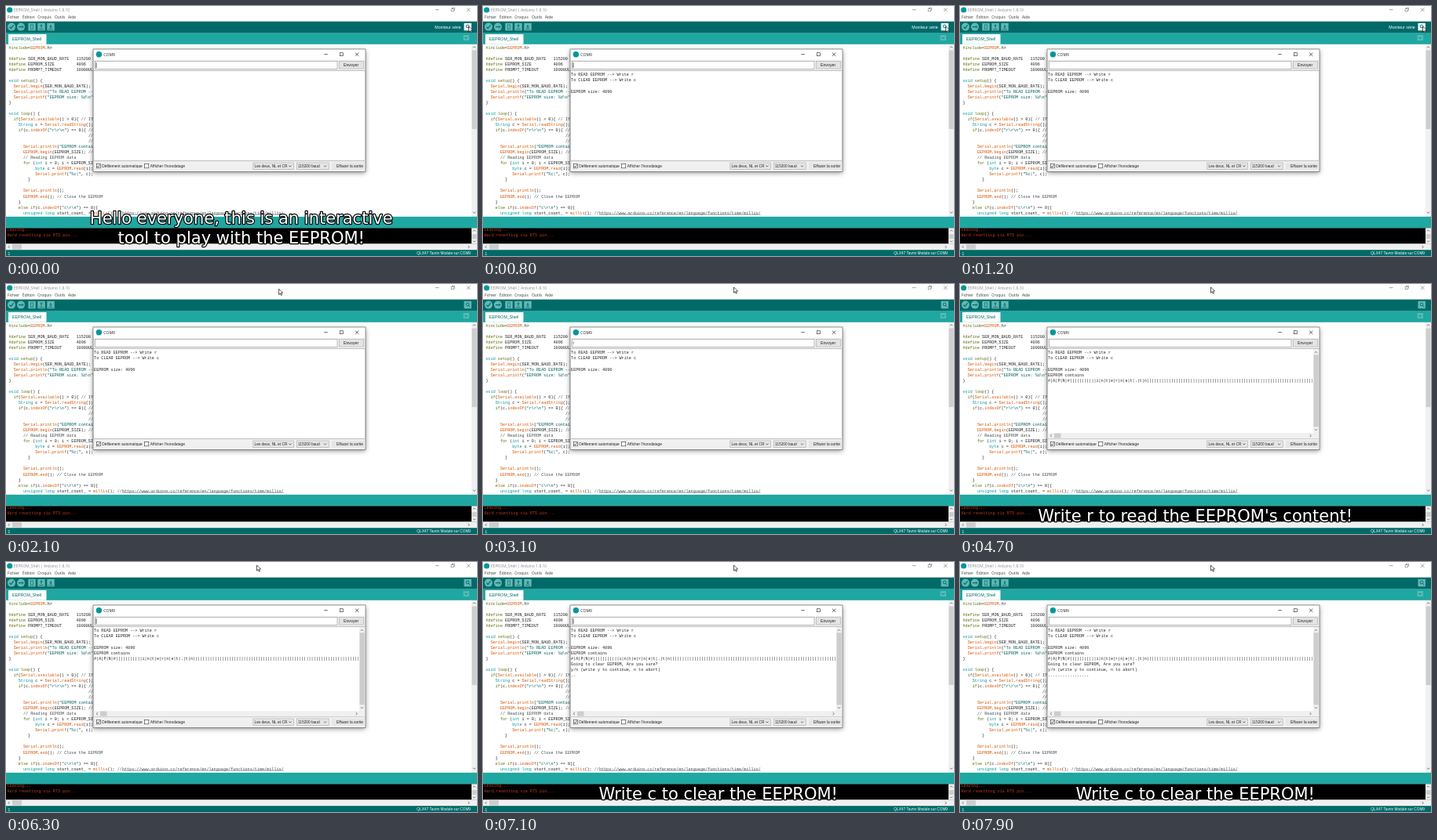
Write an HTML page with a canvas that moves like this. It is 600 px wide and 319 px high and loops after 8000 ms.

```html
<!DOCTYPE html>
<html lang="fr">
<head>
<meta charset="utf-8">
<title>EEPROM shell</title>
<style>
html, body { margin: 0; width: 100%; height: 100%; overflow: hidden; background: #fff; }
canvas { display: block; width: 600px; height: 319px; }
</style>
</head>
<body>
<canvas id="stage"></canvas>
<script>
const W = 600, H = 319, LOOP = 8000;
const canvas = document.getElementById('stage');
const dpr = window.devicePixelRatio || 1;
canvas.width = Math.round(W * dpr);
canvas.height = Math.round(H * dpr);
const ctx = canvas.getContext('2d');

const SANS = '"Liberation Sans", Arial, sans-serif';
const UI = '"Open Sans", "Noto Sans", sans-serif';
const MONO = '"Liberation Mono", "Courier New", monospace';
const CAPTION = '"DejaVu Sans", Verdana, sans-serif';
const DARK = '#006a69', TEAL = '#1fa7a2', PALE = '#f0f0f0', THUMB = '#cdcdcd';
const CODE = 5.12, PITCH = CODE * 0.6;

const SOURCE = `#include<EEPROM.h>

#define SER_MON_BAUD_RATE   115200
#define EEPROM_SIZE         4096
#define PROMPT_TIMEOUT      10000UL

void setup() {
  Serial.begin(SER_MON_BAUD_RATE);
  Serial.println("To READ EEPROM --> Write r");
  Serial.printf("EEPROM size: %d\\n", EEPROM_SIZE);
}

void loop() {
  if(Serial.available() > 0){ // If
    String c = Serial.readString();
    if(c.indexOf("r\\r\\n") == 0){ //
                                 //
                                 //
      Serial.println("EEPROM contains");
      EEPROM.begin(EEPROM_SIZE); //
      // Reading EEPROM data
      for (int i = 0; i < EEPROM_SIZE; i++){
           byte c = EEPROM.read(i);
           Serial.printf("%c|", c);
        }

      Serial.println();
      EEPROM.end(); // Close the EEPROM
    }
    else if(c.indexOf("c\\r\\n") == 0){
      unsigned long start_count_ = millis(); //https://www.arduino.cc/reference/en/language/functions/time/millis/`.split('\n');

const RULES = [
  [/^\/\/.*/, '#434f54'],
  [/^"[^"]*"?/, '#005c5f'],
  [/^#\w+/, '#5e6d03'],
  [/^(void|int|byte|String|unsigned|long)\b/, '#00979c'],
  [/^(if|else|for|setup|loop)\b/, '#5e6d03'],
  [/^(Serial|EEPROM|begin|println|printf|available|readString|indexOf|read|end|millis)\b/, '#d35400'],
  [/^\w+/, '#222'],
  [/^\s+/, null],
  [/^./, '#222']
];

const CONTENT = '#|A|P|N|#' + '|'.repeat(11) + [...'internet.tn'].join('|') + '|'.repeat(80);

// x, y: start and vertical centre of the capitals
function text(s, x, y, size, color, font = SANS, align = 'left') {
  ctx.save();
  ctx.translate(x, y + size * 0.35);
  ctx.scale(0.1, 0.1);
  ctx.font = `${size * 10}px ${font}`;
  ctx.textAlign = align;
  ctx.fillStyle = color;
  ctx.fillText(s, 0, 0);
  ctx.restore();
}

const mono = (s, x, y, color = '#222') => text(s, x, y, CODE, color, MONO);

function box(x, y, w, h, fill, stroke) {
  if (fill) { ctx.fillStyle = fill; ctx.fillRect(x, y, w, h); }
  if (stroke) {
    ctx.strokeStyle = stroke;
    ctx.lineWidth = 0.6;
    ctx.strokeRect(x + 0.3, y + 0.3, w - 0.6, h - 0.6);
  }
}

function disc(x, y, r, fill) {
  ctx.fillStyle = fill;
  ctx.beginPath();
  ctx.arc(x, y, r, 0, 7);
  ctx.fill();
}

function line(points, color, width = 0.7) {
  ctx.strokeStyle = color;
  ctx.lineWidth = width;
  ctx.beginPath();
  points.forEach(([x, y]) => ctx.lineTo(x, y));
  ctx.stroke();
}

// dir: 0 right, 1 down, 2 left, 3 up
function chevron(x, y, dir, color = '#555', r = 1.6) {
  ctx.save();
  ctx.translate(x, y);
  ctx.rotate(dir * Math.PI / 2);
  line([[-r / 2, -r], [r / 2, 0], [-r / 2, r]], color, 0.8);
  ctx.restore();
}

function windowButtons(x, y, step, color, maximised) {
  line([[x - 2.3, y], [x + 2.3, y]], color);
  const m = x + step, c = x + 2 * step;
  if (maximised) {
    box(m - 1.2, y - 2.5, 3.7, 3.7, null, color);
    box(m - 2.4, y - 1.3, 3.7, 3.7, '#fff', color);
  } else {
    box(m - 2.3, y - 2.3, 4.6, 4.6, null, color);
  }
  line([[c - 2.2, y - 2.2], [c + 2.2, y + 2.2]], color);
  line([[c - 2.2, y + 2.2], [c + 2.2, y - 2.2]], color);
}

function codeLine(s, y) {
  let col = 0;
  while (col < s.length) {
    const rest = s.slice(col);
    const [re, color] = RULES.find(([r]) => r.test(rest));
    const token = rest.match(re)[0];
    if (color) mono(token, 3.5 + col * PITCH, y, color);
    col += token.length;
  }
}

function toolbar(hover) {
  box(0, 19.7, W, 15, DARK);
  const icon = '#62b9b5', y = 26.6;
  disc(7, y, 5, icon);
  line([[4.5, y], [6.3, y + 2], [9.6, y - 2.2]], DARK, 1.2);
  disc(19, y, 5, icon);
  line([[16, y], [21.5, y]], DARK, 1.2);
  chevron(21.2, y, 0, DARK, 2);
  for (const x of [33, 45, 57, 588.2]) {
    box(x - 4.7, y - 4.7, 9.4, 9.4, hover && x > 500 ? '#fff' : icon);
  }
  box(31, y - 3, 4, 6, null, DARK);
  for (const [x, up] of [[45, true], [57, false]]) {
    line([[x, y - 2.7], [x, y + 1.1]], DARK, 1.2);
    chevron(x, up ? y - 2.2 : y + 0.6, up ? 3 : 1, DARK, 1.7);
    line([[x - 2.7, y + 3], [x + 2.7, y + 3]], DARK, 0.8);
  }
  ctx.strokeStyle = DARK;
  ctx.lineWidth = 0.9;
  ctx.beginPath();
  ctx.arc(588, y - 0.7, 1.9, 0, 7);
  ctx.stroke();
  line([[589.4, y + 0.8], [591, y + 2.8]], DARK, 1);
  if (hover) text('Moniteur série', 546.3, y + 0.2, 5.27, '#fff');
}

function editor(hover) {
  box(0, 0, W, H, '#fff');
  disc(4.7, 5, 3.6, '#00979c');
  text('EEPROM_Shell | Arduino 1.8.10', 10, 5.1, 4.88, '#888', UI);
  windowButtons(549.2, 4.7, 20, '#777', true);
  [['Fichier', 2], ['Édition', 21], ['Croquis', 40.3], ['Outils', 62], ['Aide', 79]]
    .forEach(([s, x]) => text(s, x, 14.6, 4.87, '#333', UI));
  toolbar(hover);

  box(0, 34.5, W, 14.3, TEAL);
  box(3, 36, 48.5, 12.8, '#fff');
  text('EEPROM_Shell', 8, 41.7, 5.25, DARK);
  box(582.5, 37, 7.5, 7, '#55bab6');
  chevron(586.2, 40.7, 1, DARK);

  SOURCE.forEach((s, i) => codeLine(s, 52.9 + i * 7.03));
  const link = 3.5 + 41 * PITCH + 6 * PITCH;
  line([[link, 266.1], [link + 67 * PITCH, 266.1]], '#434f54', 0.5);

  box(593, 49, 7, 220, PALE);
  box(593.5, 56.5, 6, 100.5, THUMB);
  chevron(596.6, 52.5, 3);
  chevron(596.6, 263.5, 1);

  box(0, 268.8, W, 14.6, TEAL);
  box(0, 283.3, W, 20.2, '#000');
  mono('Leaving...', 1.5, 285.4, '#c03a1a');
  mono('Hard resetting via RTS pin...', 1.5, 292.6, '#c03a1a');
  box(593, 283.3, 7, 20.2, PALE);
  box(593.5, 291, 6, 6, THUMB);
  chevron(596.6, 286.7, 3);
  chevron(596.6, 300.3, 1);
  box(0, 303.5, W, 7.7, PALE);
  box(8, 304.2, 12, 6.3, THUMB);
  chevron(3.8, 307.4, 2);
  chevron(589.5, 307.4, 0);
  box(0, 311.2, W, 8, DARK);
  text('1', 2.5, 315.8, 4.9, '#fff');
  text('QLX47 Tavrin Module sur COM9', 592, 315.8, 4.75, '#fff', SANS, 'right');
}

function checkbox(x, checked) {
  box(x, 201.3, 5.8, 5.8, '#fff', '#333');
  if (checked) line([[x + 1.2, 204.2], [x + 2.4, 205.6], [x + 4.7, 202.5]], '#222', 0.8);
}

function combo(s, x, w) {
  box(x, 199.7, w, 9, '#e6e6e6', '#adadad');
  text(s, x + 2, 204.3, 4.8, '#222');
  chevron(x + w - 5, 204.3, 1, '#444');
}

// unreadable bytes show as reversed question marks
function blankBytes(y) {
  ctx.save();
  ctx.translate(450, 0);
  ctx.scale(-1, 1);
  mono('|?'.repeat(56), 0, y, '#444');
  ctx.restore();
}

function output(t) {
  const printed = t >= 3400, right = printed && t < 4200;
  ctx.save();
  ctx.beginPath();
  ctx.rect(111.5, 83, printed ? 338.5 : 346, 114);
  ctx.clip();
  if (right) {
    blankBytes(122.5);
  } else if (t >= 800) {
    const put = (s, row) => mono(s, 112.1, 87.5 + row * 7.1);
    put('To READ EEPROM --> Write r', 0);
    put('To CLEAR EEPROM --> Write c', 1);
    put('EEPROM size: 4096', 3);
    if (printed) {
      put('EEPROM contains', 4);
      put(CONTENT, 5);
    }
    if (t >= 7000) {
      put('Going to clear EEPROM, Are you sure?', 6);
      put('y/n (write y to continue, n to abort)', 7);
      put('.'.repeat(Math.max(0, Math.min(17, Math.floor((t - 7000) / 50)))), 8);
    }
  }
  ctx.restore();
  if (!printed) return;
  box(450, 83, 7.3, 107, PALE);
  box(450.5, 90.3, 6.3, 92, THUMB);
  chevron(453.5, 87, 3);
  chevron(453.5, 186, 1);
  box(111.7, 190, 345.6, 7.3, PALE);
  if (right) box(422, 190.6, 20.5, 6, THUMB);
  else box(120, 190.6, 8.5, 6, THUMB);
  chevron(116, 193.6, 2);
  chevron(446.5, 193.6, 0);
}

function caretOn(t) {
  if (t < 2800) return Math.floor((t + 400) / 500) % 2 === 0;
  if (t < 3300) return false;
  if (t < 5000) return t < 4500;
  if (t < 6700) return Math.floor(t / 500) % 2 === 0;
  return t >= 7000 && t < 7500;
}

function monitor(t) {
  ctx.save();
  ctx.shadowColor = 'rgba(0,0,0,.45)';
  ctx.shadowBlur = 6 * dpr;
  ctx.shadowOffsetY = 1.5 * dpr;
  box(111, 55, 347, 156.3, PALE);
  ctx.restore();
  box(111, 55, 347, 13.7, '#fff');
  box(110.7, 54.7, 347.6, 156.9, null, '#555');
  disc(118.4, 61.7, 3.7, '#00979c');
  text('COM9', 124.3, 61.9, 5.1, '#222', UI);
  windowButtons(407.5, 61.7, 19.8, '#222');

  box(113, 70, 309.3, 10.7, '#fff', '#8a8a8a');
  box(424, 70.3, 32, 10, '#e4e4e4', '#adadad');
  text('Envoyer', 439.6, 75.6, 5.3, '#222', SANS, 'center');
  const typed = t >= 2800 && t < 3300 ? 'r' : t >= 6700 && t < 7000 ? 'c' : '';
  text(typed, 114.6, 75.5, 5, '#222');
  if (caretOn(t)) line([[115, 72.2], [115, 79]], '#222', 0.8);

  box(111.3, 82.3, 346.4, 115.4, '#fff', '#999');
  output(t);

  checkbox(115, true);
  text('Défilement automatique', 122.3, 204.3, 4.88, '#222');
  checkbox(176.3, false);
  text("Afficher l'horodatage", 183.8, 204.3, 4.84, '#222');
  combo('Les deux, NL et CR', 314.5, 52.5);
  combo('115200 baud', 370, 41.5);
  box(415, 199.7, 42.3, 9, '#e6e6e6');
  text('Effacer la sortie', 421, 204.3, 4.9, '#222');
}

function pointer(t) {
  const p = Math.max(0, Math.min(1, (t - 1700) / 500));
  const e = p * p * (3 - 2 * p);
  ctx.save();
  ctx.translate(589.5 - 270 * e, 26 - 22 * e);
  ctx.beginPath();
  [[0, 0], [0, 7.2], [1.7, 5.7], [2.8, 8.2], [4, 7.7], [2.9, 5.2], [5.1, 5.1]]
    .forEach(([x, y]) => ctx.lineTo(x, y));
  ctx.closePath();
  ctx.fillStyle = '#fff';
  ctx.fill();
  ctx.strokeStyle = '#111';
  ctx.lineWidth = 0.7;
  ctx.stroke();
  ctx.restore();
}

function caption(t) {
  let lines = [];
  if (t < 100) lines = ['Hello everyone, this is an interactive', 'tool to play with the EEPROM!'];
  else if (t >= 3200 && t < 5200) lines = ["Write r to read the EEPROM's content!"];
  else if (t >= 6500) lines = ['Write c to clear the EEPROM!'];
  ctx.save();
  ctx.font = `21px ${CAPTION}`;
  ctx.textAlign = 'center';
  ctx.lineJoin = 'round';
  ctx.lineWidth = 2.4;
  ctx.strokeStyle = '#000';
  ctx.fillStyle = '#fff';
  lines.forEach((s, i) => {
    const y = 302.7 - (lines.length - 1 - i) * 24.4;
    ctx.strokeText(s, 299.7, y);
    ctx.fillText(s, 299.7, y);
  });
  ctx.restore();
}

function draw(t) {
  ctx.setTransform(dpr, 0, 0, dpr, 0, 0);
  editor(t < 1750);
  monitor(t);
  pointer(t);
  caption(t);
}

let start = null;
function tick(now) {
  if (start === null) start = now;
  draw((now - start) % LOOP);
  requestAnimationFrame(tick);
}
draw(0);
requestAnimationFrame(tick);
</script>
</body>
</html>
```
